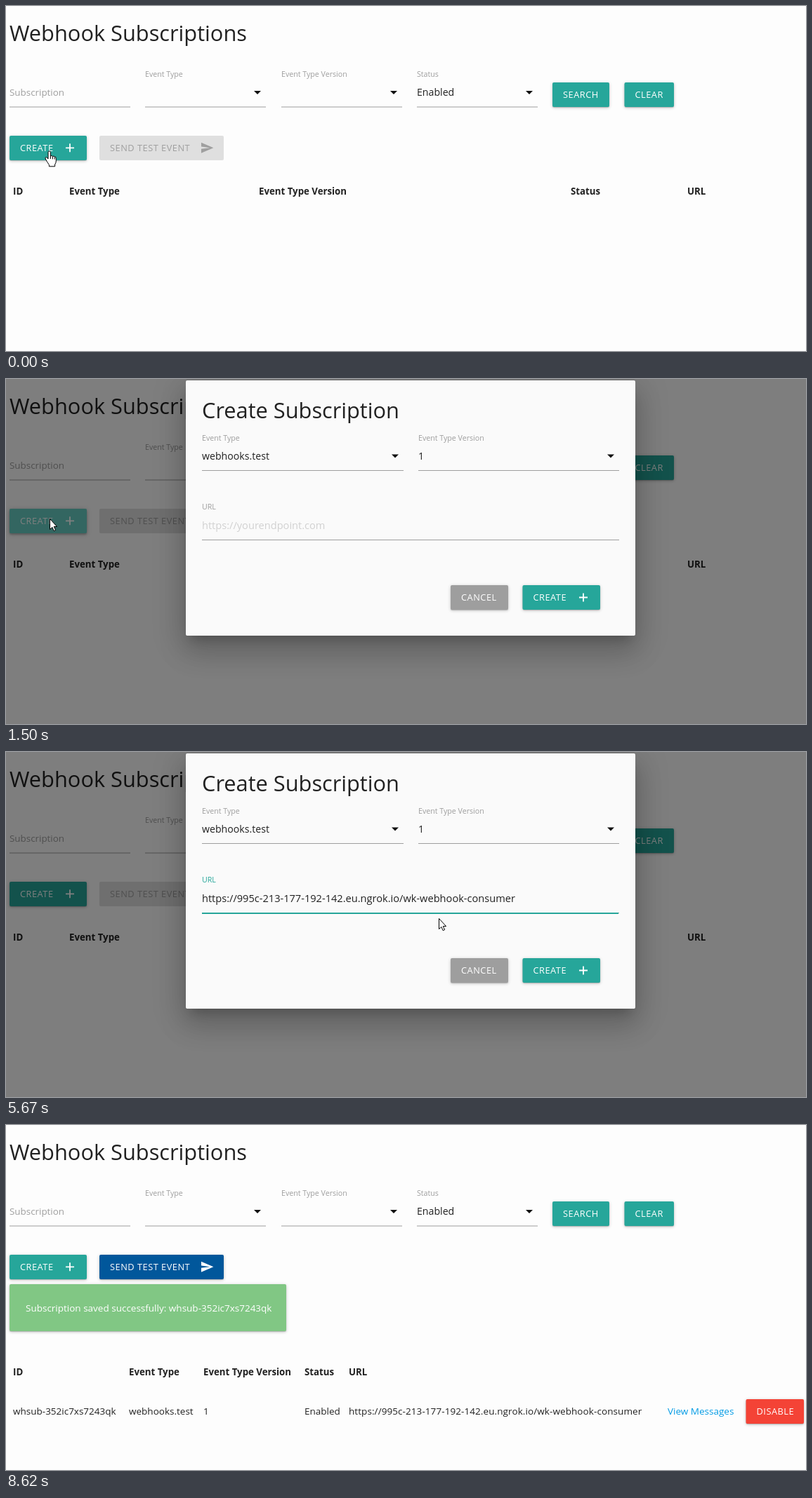
An HTML page that plays this animation: 1139 px wide and 492 px high, repeating every 9.35 s.

```html
<!DOCTYPE html>
<html lang="en">
<head>
<meta charset="utf-8">
<title>Webhook Subscriptions</title>
<style>
html, body { margin: 0; width: 100%; height: 100%; overflow: hidden; background: #fdfdfd; }
svg, #shade, #modal { position: absolute; left: 0; top: 0; display: block; }
#shade { width: 1139px; height: 492px; background: #000; }
#modal {
  left: 256px; top: 2px; width: 640px; height: 364px; background: #fafafa; border-radius: 2px;
  box-shadow: 0 24px 38px 3px rgba(0,0,0,.14), 0 9px 46px 8px rgba(0,0,0,.12), 0 11px 15px -7px rgba(0,0,0,.2);
}
text { font-family: "Open Sans", "Noto Sans", sans-serif; font-size: 13.5px; fill: #212121; white-space: pre; }
.title { font-size: 30.75px; }
.label { font-size: 10.65px; fill: #9e9e9e; }
.value { font-size: 14.15px; }
.address { font-size: 14.6px; }
.hint { font-size: 13.4px; fill: #9e9e9e; }
.head { font-size: 13.25px; font-weight: 700; }
.caps { font-size: 12.8px; letter-spacing: .5px; fill: #fff; }
#form .caps { font-weight: 500; }
.raised { filter: drop-shadow(0 1px 2px rgba(0,0,0,.22)) drop-shadow(0 1px .5px rgba(0,0,0,.16)); }
.hover { filter: drop-shadow(0 1px 3px rgba(0,0,0,.2)) drop-shadow(0 2px 1px rgba(0,0,0,.2)); }
</style>
</head>
<body>
<svg id="page" width="1139" height="492"></svg>
<div id="shade"></div>
<div id="modal"><svg id="form" width="640" height="364" viewBox="256 2 640 364"></svg></div>
<svg id="pointer" width="1139" height="492"></svg>
<script>
const LOOP = 9350, TEAL = '#26a69a', BRIGHT = '#2bbbad';
const ENDPOINT = 'https://995c-213-177-192-142.eu.ngrok.io/wk-webhook-consumer';
const SUB_ID = 'whsub-352ic7xs7243qk';
const $ = id => document.getElementById(id);

const text = (x, y, s, cls = '', attrs = '') => `<text x="${x}" y="${y}" class="${cls}" ${attrs}>${s}</text>`;
const rect = (x, y, w, h, fill, attrs = '') =>
  `<rect x="${x}" y="${y}" width="${w}" height="${h}" fill="${fill}" ${attrs}/>`;
const line = (x, y, w) => rect(x, y, w, 1, '#9e9e9e');
const plus = (x, y) => `<path d="M${x - 6} ${y}h12m-6-6v12" stroke="#fff" stroke-width="1.8"/>`;
const plane = fill => `<path d="M2 21L23 12 2 3V10L17 12 2 14Z" fill="${fill}" transform="translate(276.3 192.2) scale(.83)"/>`;
const button = (x, y, w, label, fill, id = '') =>
  rect(x, y, w, 35, fill, `rx="2" class="raised" ${id && `id="${id}"`}`) + text(x + 15, y + 22, label, 'caps');
const select = (x, y, w, label, value = '') =>
  text(x, y - 42.5, label, 'label') + text(x, y - 15.5, value, 'value') + line(x, y, w) +
  `<path d="M${x + w - 17} ${y - 22.5}h10l-5 5z" fill="#111"/>`;
const heads = (y, ...xs) => ['ID', 'Event Type', 'Event Type Version', 'Status', 'URL']
  .map((s, i) => text(xs[i], y, s, 'head')).join('');

$('page').innerHTML =
  text(5, 50, 'Webhook Subscriptions', 'title') +
  text(5, 128, 'Subscription', 'hint') + line(5, 143.5, 172) +
  select(198, 143.5, 172, 'Event Type') + select(392, 143.5, 172, 'Event Type Version') +
  select(585, 143.5, 172, 'Status', 'Enabled') +
  button(778, 109, 81, 'SEARCH', TEAL) + button(880.5, 109, 70.5, 'CLEAR', TEAL) +
  button(5, 185, 110, 'CREATE', TEAL, 'open') + plus(91, 202.3) +
  rect(5, 185, 110, 35, '#fff', 'rx="2" id="wave" opacity=".28"') +
  `<g id="empty">${rect(133, 185, 177, 35, '#dfdfdf', 'rx="2"') +
    text(148, 207, 'SEND TEST EVENT', 'caps', 'style="fill:#9f9f9f"') + plane('#9f9f9f') +
    heads(269, 10, 90, 360, 804, 970)}</g>` +
  `<g id="saved">${button(133, 185, 177, 'SEND TEST EVENT', '#01579b') + plane('#fff') +
    rect(5, 227, 394, 67, '#81c784', 'rx="2" class="raised"') +
    text(28, 266, 'Subscription saved successfully: ' + SUB_ID, '', 'style="fill:#fff"') +
    heads(357, 10, 175, 281, 425, 488) +
    text(10, 413, SUB_ID) + text(175, 413, 'webhooks.test') + text(281, 413, '1') +
    text(425, 413, 'Enabled') + text(488, 413, ENDPOINT, '', 'letter-spacing=".08"') +
    text(942, 413, 'View Messages', '', 'style="fill:#039be5"') +
    button(1053.5, 391, 82.5, 'DISABLE', '#f44336')}</g>`;

$('form').innerHTML =
  text(279, 56, 'Create Subscription', 'title') +
  select(279, 130, 287, 'Event Type', 'webhooks.test') +
  select(587, 130, 286, 'Event Type Version', '1') +
  text(279, 186, 'URL', 'label', 'id="urlLabel"') +
  text(279, 214, '', 'address', 'id="url"') +
  line(279, 229, 594) + rect(279, 229, 593, 2, TEAL, 'id="focusLine"') +
  rect(279, 198, 1, 20, '#000', 'id="caret"') +
  button(633, 294, 82, 'CANCEL', '#9e9e9e') +
  button(735.5, 294, 110.5, 'CREATE', TEAL, 'submit') + plus(822, 311.5) +
  `<clipPath id="clip">${rect(735.5, 294, 110.5, 35, '#000', 'rx="2"')}</clipPath>
  <circle id="ripple" cx="772" cy="312" fill="#fff" opacity=".3" clip-path="url(#clip)"/>`;

$('pointer').innerHTML = `<g id="cursor" stroke="#000" stroke-linejoin="round">
  <path id="hand" fill="#fff" d="M-2 11V1.6Q-2 0-.3 0T1.4 1.6V7Q3.3 5.8 4.5 7.4Q6.3 6.4 7.3 8.2Q9.2 7.6 9.3 9.8V14
    Q9.2 17 7.6 19V21.8H-.6V19.5L-3.2 15.6L-5.8 11Q-6.6 8.6-4.6 8.6ZM1.4 7V11M4.5 7.4V11.4M7.3 8.2V11.6"/>
  <path id="arrow" fill="#fff" d="M.5.5V15.5L3.9 12.4 6.2 17.6 8.6 16.5 6.3 11.5H10.6Z"/>
  <path id="beam" fill="none" d="M-3-7Q0-7 0-5.5Q0-7 3-7M0-5.5V5.5M-3 7Q0 7 0 5.5Q0 7 3 7"/></g>`;

// time, shape, x, y: the pointer holds each place until the next
const moves = [
  [0, 'hand', 62, 207], [130, 'hand', 62, 199], [1240, 'arrow', 62, 199],
  [2020, 'arrow', 132, 198], [2140, 'arrow', 260, 194], [2270, 'beam', 390, 195],
  [2390, 'beam', 475, 196], [2540, 'beam', 516, 210], [2700, 'beam', 521, 210.5],
  [5060, 'beam', 520.5, 210.5], [5210, 'beam', 525, 210.5], [5360, 'beam', 526, 210.5],
  [5520, 'beam', 553, 216.5], [5670, 'arrow', 616, 237], [5820, 'arrow', 710, 275],
  [5970, 'hand', 755, 303], [6100, 'hand', 771, 311], [6790, 'arrow', 770, 311],
  [7630, 'arrow', 778, 311], [8100, 'arrow', 785, 318], [8230, 'arrow', 802, 331],
  [8380, 'arrow', 962, 438], [8500, 'arrow', 1039, 476], [8620, 'arrow', 1150, 520]
];
const caretToggles = [3110, 3670, 3950, 4470, 5060, 5520, 6100, 6650];

const clamp = v => Math.max(0, Math.min(1, v));
const show = (id, on) => { $(id).style.display = on ? '' : 'none'; };
// eased progress input, advanced in 130 ms ticks
const ramp = (t, start, lead, span) =>
  t < start ? 0 : clamp((Math.floor((t - start) / 130) * 130 + lead) / span);

function draw(t) {
  const saved = t >= 7070, open = t >= 1240 && !saved;
  show('saved', saved);
  show('empty', !saved);
  show('shade', open);
  show('modal', open);

  const clicked = t >= 130 && t < 1760;
  show('wave', clicked);
  $('open').setAttribute('fill', clicked ? BRIGHT : TEAL);
  $('open').setAttribute('class', clicked ? 'hover' : 'raised');

  const u = ramp(t, 1240, 8, 260), p = 1 - (1 - u) ** 3;
  $('shade').style.opacity = .5 * (1 - (1 - u) ** 2);
  $('modal').style.opacity = p;
  $('modal').style.transform = p < 1 ? `translateY(${-43 * (1 - p)}px) scale(${.8 + .2 * p})` : 'none';

  const focus = t < 6790 ? ramp(t, 3110, 60, 300) : t < 6930 ? .4 : 0;
  $('urlLabel').style.fill = `color-mix(in srgb, ${TEAL} ${focus * 100}%, #9e9e9e)`;
  $('focusLine').setAttribute('opacity', focus);

  const pasted = t >= 3950;
  $('url').textContent = pasted ? ENDPOINT : 'https://yourendpoint.com';
  $('url').style.fill = pasted ? '#212121' : '#d1d1d1';
  $('caret').setAttribute('x', pasted ? 724 : 279);
  show('caret', caretToggles.filter(c => c <= t).length % 2);

  const pressed = t >= 6790;
  $('submit').setAttribute('fill', pressed ? '#54c4b9' : t >= 5970 ? BRIGHT : TEAL);
  $('submit').setAttribute('class', t >= 6100 ? 'hover' : 'raised');
  $('ripple').setAttribute('r', !pressed ? 0 : t < 6930 ? 28 : 64);

  const [, shape, x, y] = moves.findLast(m => m[0] <= t);
  for (const id of ['hand', 'arrow', 'beam']) show(id, id === shape);
  $('cursor').setAttribute('transform', `translate(${x} ${y})`);
}

const begin = performance.now();
function tick() {
  draw((performance.now() - begin) % LOOP);
  requestAnimationFrame(tick);
}
tick();
</script>
</body>
</html>
```
